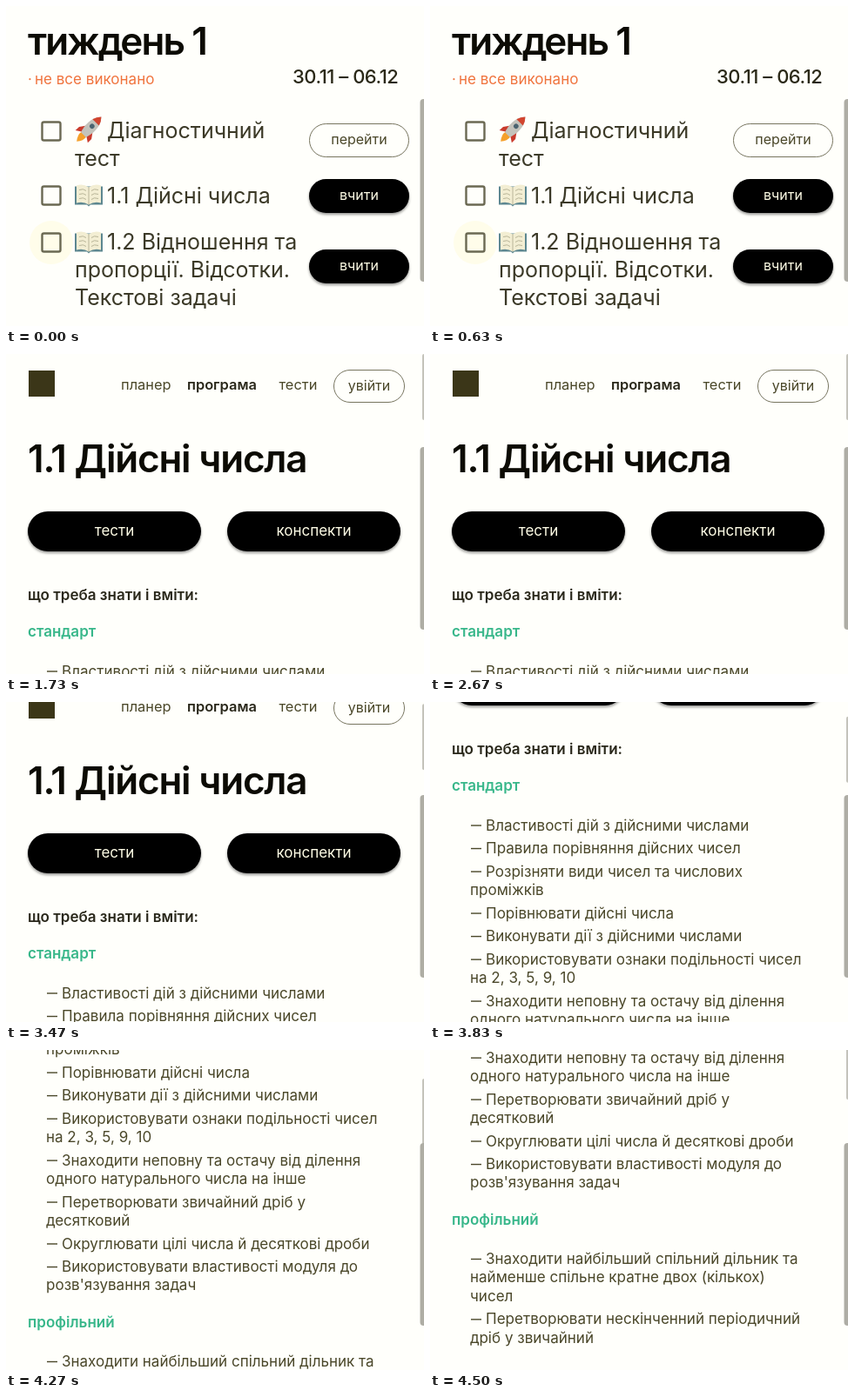
An HTML page for the animation above (4.53 s loop, 480x368 px).

```html
<!DOCTYPE html>
<html lang="uk">
<meta charset="utf-8">
<style>
  html, body { margin: 0; width: 100%; height: 100%; overflow: hidden; background: #fffffb; }
  svg { display: block; font: 17.05px Inter, "Open Sans", sans-serif; fill: #4a4729; }
  text { white-space: pre; }
  .title { font-size: 44px; font-weight: 600; letter-spacing: -1.9px; fill: #0c0b04; }
  .topic { letter-spacing: -1.2px; }
  .date { font-size: 22px; font-weight: 500; letter-spacing: -.5px; fill: #2b2918; }
  .status { fill: #f0743e; }
  .item { font-size: 25px; fill: #3b3927; }
  .label { font-size: 16px; text-anchor: middle; }
  .big { font-size: 17px; }
  .light { fill: #fffde6; }
  .nav { font-size: 16.4px; }
  .bold { font-weight: 600; fill: #29271a; }
  .level { font-weight: 600; fill: #38b78a; }
  .outline { fill: none; stroke: #77755f; }
  .box { fill: none; stroke: #6b6953; stroke-width: 2.4; }
  .dash { stroke: #4a4729; stroke-width: 1.4; }
  .solid { fill: #000; filter: drop-shadow(0 2px 1.5px #0006); }
</style>
<svg id="stage" width="480" height="368" viewBox="0 0 480 368"></svg>
<script>
const LOOP = 4530, OPEN_AT = 1670;
// Scroll offset of the topic page: [ms, px]
const SCROLL = [[3410, 0], [3470, 29], [3830, 223], [4070, 337], [4500, 558], [4530, 562]];

const text = (cls, x, y, s) => `<text class="${cls}" x="${x}" y="${y}">${s}</text>`;
const pill = (cls, x, y, w, h) =>
  `<rect class="${cls}" x="${x}" y="${y}" width="${w}" height="${h}" rx="${h / 2}"/>`;
const button = (x, y, w, h, s, solid, size = '') =>
  pill(solid ? 'solid' : 'outline', x, y, w, h) +
  text(`label ${size} ${solid ? 'light' : ''}`, x + w / 2, y + h / 2 + 4.5, s);
const checkbox = y => `<rect class="box" x="41.5" y="${y - 10.5}" width="21" height="21" rx="2"/>`;

const rocket = `<g transform="translate(96 141) rotate(45)">
  <path d="M-4 9Q-5 15 0 21Q5 15 4 9Z" fill="#f5a02c"/>
  <path d="M-5 0L-10 7V13L-4 9H4L10 13V7L5 0Z" fill="#c93a2c"/>
  <path d="M0-19C8-11 7 2 4 10H-4C-7 2-8-11 0-19Z" fill="#c4c3bb"/>
  <path d="M0-19Q4-15 5.2-10H-5.2Q-4-15 0-19Z" fill="#d2452f"/>
  <circle cy="-4" r="2.8" fill="#4b6470"/></g>`;
const book = y => `<g transform="translate(95 ${y})">
  <path d="M-16-10H16V11H2L0 13L-2 11H-16Z" fill="#5d8790"/>
  <path d="M0-9Q-7-14-14-11V9Q-6 7 0 11Q6 7 14 9V-11Q7-14 0-9Z" fill="#f3eed3"/>
  <path d="M0-9V11M-11-6Q-6-8-3-5M-11-1Q-6-3-3 0M-11 4Q-6 2-3 5M11-6Q6-8 3-5M11-1Q6-3 3 0M11 4Q6 2 3 5"
    fill="none" stroke="#b9b598"/></g>`;

// Each item is an array of wrapped lines; y is the first baseline
function list(y, items) {
  return items.map(lines => {
    const rows = lines.map((s, i) => text('', i ? 46 : 64, y + i * 21.4, s)).join('');
    const dash = `<path class="dash" d="M47 ${y - 5.5}h12"/>`;
    y += lines.length * 21.4 + 5.15;
    return dash + rows;
  }).join('');
}

const plan = text('title', 25, 56, 'тиждень 1') +
  text('status', 25, 90, '·') + text('status', 33, 90, 'не все виконано') +
  text('date', 329, 89, '30.11 – 06.12') +
  '<circle cx="52" cy="272" r="25" fill="#fffdea"/>' +
  [144, 218, 272].map(checkbox).join('') + rocket + book(217.5) + book(271.5) +
  [[116, 152, 'Діагностичний'], [79, 184, 'тест'], [116, 227, '1.1 Дійсні числа'],
   [116, 280, '1.2 Відношення та'], [79, 312, 'пропорції. Відсотки.'], [79, 344, 'Текстові задачі']]
    .map(a => text('item', ...a)).join('') +
  button(348.5, 135.5, 114, 38, 'перейти') +
  button(348, 199, 115, 39, 'вчити', true) +
  button(348, 280, 115, 39, 'вчити', true);

const topic = '<rect x="26" y="19" width="30" height="30" fill="#3b3618"/>' +
  text('nav', 132, 41, 'планер') + text('nav bold', 208, 41, 'програма') + text('nav', 313.5, 41, 'тести') +
  button(376.5, 18.5, 81, 37, 'увійти') +
  text('title topic', 25, 136, '1.1 Дійсні числа') +
  button(25, 181, 199, 46, 'тести', true, 'big') +
  button(254, 181, 199, 46, 'конспекти', true, 'big') +
  text('bold', 25, 283, 'що треба знати і вміти:') +
  text('level', 25, 325, 'стандарт') +
  list(370.5, [
    ['Властивості дій з дійсними числами'],
    ['Правила порівняння дійсних чисел'],
    ['Розрізняти види чисел та числових', 'проміжків'],
    ['Порівнювати дійсні числа'],
    ['Виконувати дії з дійсними числами'],
    ['Використовувати ознаки подільності чисел', 'на 2, 3, 5, 9, 10'],
    ['Знаходити неповну та остачу від ділення', 'одного натурального числа на інше'],
    ['Перетворювати звичайний дріб у', 'десятковий'],
    ['Округлювати цілі числа й десяткові дроби'],
    ['Використовувати властивості модуля до', "розв'язування задач"]]) +
  text('level', 25, 759, 'профільний') +
  list(804, [
    ['Знаходити найбільший спільний дільник та', 'найменше спільне кратне двох (кількох)', 'чисел'],
    ['Перетворювати нескінченний періодичний', 'дріб у звичайний']]);

const $ = id => document.getElementById(id);
$('stage').innerHTML = `<g id="plan">${plan}</g><g id="topic">${topic}</g>
  <rect id="thumb" x="478" width="4" height="76" rx="2" fill="#c4c3bb"/>
  <rect x="475.5" y="107" width="8" height="210" rx="4" fill="#aeada5"/>`;

function scrollAt(t) {
  const i = SCROLL.findIndex(([ms]) => ms > t);
  if (i < 1) return 0;
  const [t0, y0] = SCROLL[i - 1], [t1, y1] = SCROLL[i];
  return y0 + (y1 - y0) * (t - t0) / (t1 - t0);
}

function draw(now) {
  const t = now % LOOP, opened = t >= OPEN_AT, y = scrollAt(t);
  $('plan').style.display = opened ? 'none' : '';
  $('topic').style.display = $('thumb').style.display = opened ? '' : 'none';
  $('topic').setAttribute('transform', `translate(0 ${-Math.round(y)})`);
  $('thumb').setAttribute('y', t < 4400 ? y * 0.075 : -19);
  requestAnimationFrame(draw);
}
draw(performance.now());
</script>
</html>
```
